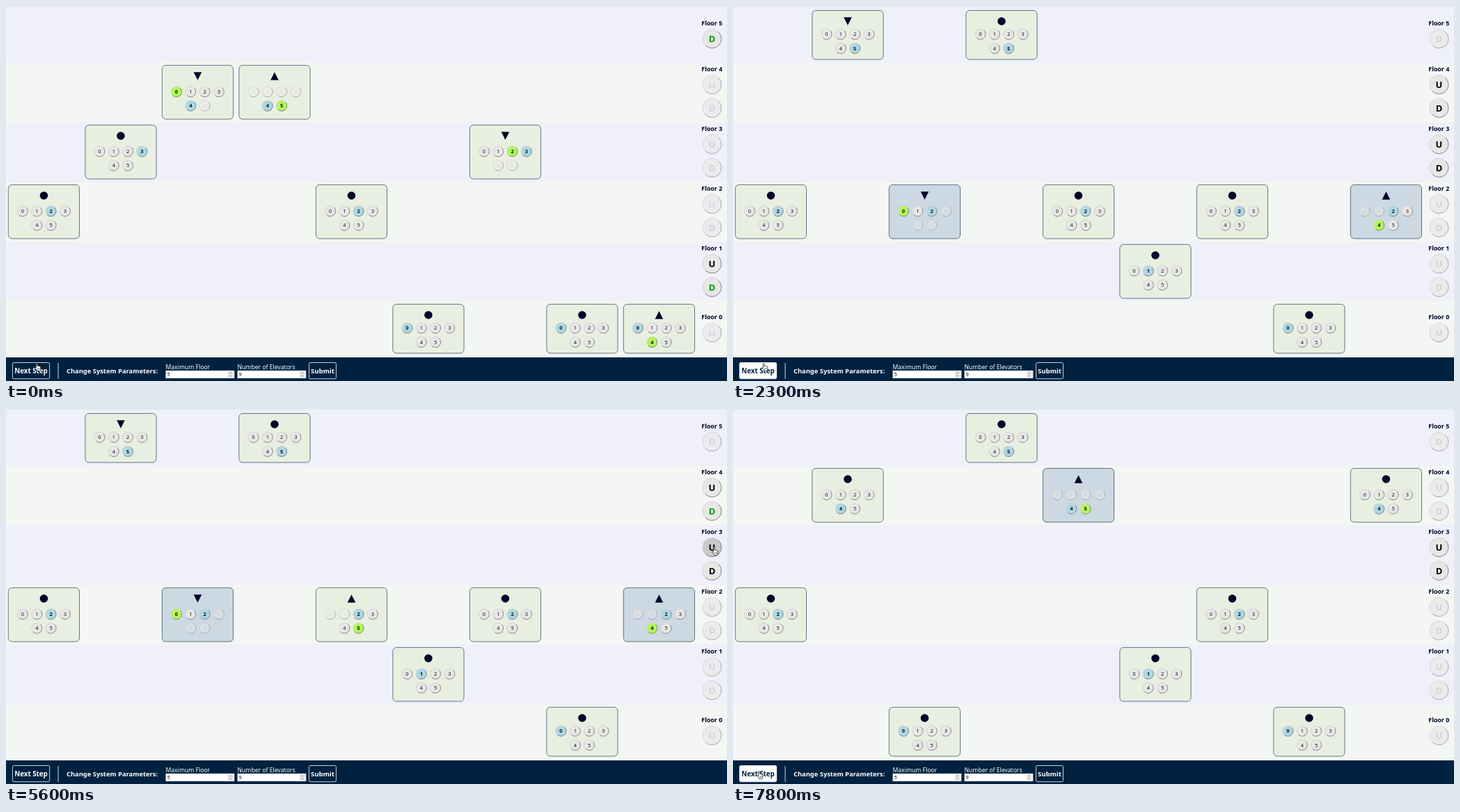
Write an HTML page that moves like this. It is 1036x540 px and loops after 8 s.

```html
<!DOCTYPE html>
<html lang="en">
<head>
<meta charset="utf-8">
<title>Elevators</title>
<style>
html, body { margin: 0; width: 100%; height: 100%; overflow: hidden; background: #f3f6f2; }
svg { display: block; width: 1036px; height: 540px; font-family: "Noto Sans", "Open Sans", sans-serif; }
</style>
</head>
<body>
<svg id="stage" viewBox="0 0 1036 540"></svg>
<script>
const LOOP = 8000, TICK = 100, TOP = 5;
const NAVY = '#002140', INK = '#000428', LAVENDER = '#f0f0fb';
const BOLD = 'font-weight="700"', MID = 'text-anchor="middle"';
const stage = document.getElementById('stage');

// --- Elevator model: direction is -1, 0 or 1; a call is a floor and U or D

const newCars = () => [...'234420300'].map((f, i) => {
  const floor = +f, digit = '--05--2-4'[i];
  const goal = digit === '-' ? null : +digit;
  return { floor, goal, dir: goal === null ? 0 : Math.sign(goal - floor), call: null, moving: false };
});

function advance(car) {
  const stop = car.call ? +car.call[0] : car.goal;
  if (stop === null) { car.dir = 0; return; }
  car.dir = Math.sign(stop - car.floor);
  car.floor += car.dir;
  car.moving = car.floor !== stop;
  if (car.moving) return;
  if (car.call) {
    car.dir = car.call[1] === 'U' ? 1 : -1;
    car.call = null;
  } else {
    car.goal = null;
    car.dir = 0;
  }
}

const step = cars => cars.forEach(advance);
const assign = (i, call) => cars => { cars[i].call = call; };
const send = (i, goal) => cars => { cars[i].goal = goal; cars[i].dir = Math.sign(goal - cars[i].floor); };

const events = [
  [0, assign(1, '5D')], [0, assign(5, '1D')],
  [1500, step], [2300, step],
  [4000, send(4, 5)], [5000, assign(1, '4D')], [5700, assign(4, '3U')],
  [7300, step], [7800, step]
];

function carsAt(t) {
  const cars = newCars();
  for (const [time, act] of events) if (time <= t) act(cars);
  return cars;
}

// --- Pointer: each move has a start, an end and a resting place

const moves = [
  [0, 0, 41, 514], [2900, 3800, 503, 315], [3950, 4800, 1013, 146], [5000, 5300, 1015, 201],
  [5400, 5600, 1014, 199], [5600, 5700, 1015, 225], [5800, 6700, 71, 525], [6700, 6800, 52, 527],
  [6900, 7000, 46, 523], [7100, 7200, 34, 521]
];

const easeOut = p => 1 - (1 - p) ** 3;
const overshoot = p => 1 + 2.2 * (p - 1) ** 3 + 1.2 * (p - 1) ** 2;

function pointerAt(t) {
  const i = moves.filter(m => m[0] <= t).length - 1;
  const [start, end, x, y] = moves[i];
  if (t >= end) return { x, y, far: false };
  const [, , x0, y0] = moves[i - 1];
  const p = (t - start) / (end - start);
  return { x: x0 + (x - x0) * overshoot(p), y: y0 + (y - y0) * easeOut(p), far: end - start > 200 };
}

// --- Drawing

const rect = (x, y, w, h, fill, extra = '') =>
  `<rect x="${x}" y="${y}" width="${w}" height="${h}" fill="${fill}" ${extra}/>`;
const text = (x, y, size, str, fill, extra = '') =>
  `<text x="${x}" y="${y}" font-size="${size}" fill="${fill}" ${extra}>${str}</text>`;

// Round button with an outset border; darkens under the pointer
function knob(x, y, r, label, size, ptr, o) {
  const e = r - 0.5, d = e * Math.SQRT1_2;
  const over = !o.off && !ptr.far && Math.hypot(ptr.x + 3 - x, ptr.y + 1 - y) < r;
  const half = (sweep, color) =>
    `<path d="M${x + d} ${y - d}A${e} ${e} 0 0 ${sweep} ${x - d} ${y + d}" fill="none" stroke="${color}"/>`;
  return `<circle cx="${x}" cy="${y}" r="${r}" fill="${over ? '#c9c9cb' : o.fill}"/>` +
    half(0, o.off ? 'rgba(190,190,190,.4)' : '#d4d4d4') + half(1, o.off ? '#a9a9a9' : '#858585') +
    text(x, y + size * 0.36, size, label, o.ink, MID + (o.bold ? ' ' + BOLD : ''));
}

function drawCar(car, i, ptr) {
  const end = car.floor % TOP === 0;
  const x = 3.3 + 110.5 * i, y = car.floor === TOP ? 6.4 : 429.4 - 86 * car.floor;
  const mid = x + 51.1, ay = y + 15.6, a = 5.8 * car.dir;
  const shown = car.goal ?? (car.moving ? +car.call[0] : null);
  let s = rect(x, y, 102.2, end ? 70.6 : 77.6, car.moving ? '#ccd8e2' : '#e9efe0',
    `rx="5.4" stroke="${NAVY}" stroke-width=".6"`);
  s += car.dir
    ? `<path d="M${mid - 5.8} ${ay + a}h11.6L${mid} ${ay - a}z" fill="${INK}"/>`
    : `<circle cx="${mid}" cy="${ay}" r="5.8" fill="${INK}"/>`;
  for (let n = 0; n <= TOP; n++) {
    const row = n < 4 ? 0 : 1, col = n - (row ? 4.5 : 1.5);
    const here = n === car.floor, goal = n === shown;
    const off = (n - car.floor) * car.dir < 0;
    s += knob(mid + col * 20.3, y + (end ? 34.3 : 38) + row * 20.3, 8, n, 7.4, ptr, {
      off, bold: here || goal,
      fill: here ? '#add8e6' : goal ? '#b2f75a' : off ? 'rgba(236,236,236,.4)' : '#e7e7e6',
      ink: off ? 'rgba(16,16,16,.08)' : '#111'
    });
  }
  return s;
}

function drawFloor(f, cars, ptr) {
  const y = f === TOP ? 25 : f === 0 ? 448 : 435 - 86 * f;
  let s = text(1014.3, y + 3.2, 8.9, 'Floor ' + f, INK, MID + ' ' + BOLD);
  const kinds = f === TOP ? 'D' : f === 0 ? 'U' : 'UD';
  [...kinds].forEach((kind, i) => {
    const lit = cars.some(c => c.call === f + kind);
    const wrongWay = kind === 'U' ? -1 : 1;
    const off = !lit && cars.some(c => c.floor === f && !c.moving && c.dir !== wrongWay);
    s += knob(1014.5, y + 22.2 + i * 33.8, 14, kind, 13, ptr, {
      off, bold: true,
      fill: off ? '#ebebee' : '#e7e7e6',
      ink: lit ? '#0a9a0a' : off ? '#d3d3d9' : '#000'
    });
  });
  return s;
}

function field(x, label, value) {
  const sx = x + 89;
  return text(x, 522.5, 8.6, label, '#fff') +
    rect(x, 525, 98.6, 11, '#fff', 'stroke="#8f8f9d" stroke-width=".6"') +
    text(x + 2, 533.4, 7.4, value, '#111') +
    rect(sx, 526, 8, 9, '#ececec', 'rx="1"') +
    `<path d="M${sx + 2.2} 529.4l1.8 -1.8l1.8 1.8M${sx + 2.2} 531.6l1.8 1.8l1.8 -1.8" fill="none" stroke="#666" stroke-width=".8"/>`;
}

function button(x, w, size, label, fill) {
  return rect(x, 513.5, w, 23.3, `rgba(255,255,255,${fill})`, 'rx="2" stroke="#fff" stroke-width=".8"') +
    text(x + w / 2, 529.2, size, label, fill > 0.5 ? NAVY : '#fff', MID + ' ' + BOLD);
}

function drawFooter(t) {
  const glow = t < 2800 ? Math.min(t / 200, 1) : +(t >= 6800);
  return rect(0, 506, 1036, 34, NAVY) +
    button(9.4, 53.2, 9.75, 'Next Step', glow) +
    rect(74.5, 514, 1, 23, '#cfd6dd') +
    text(87, 529, 9.35, 'Change System Parameters:', '#fff', BOLD) +
    field(229.5, 'Maximum Floor', TOP) + field(332.5, 'Number of Elevators', 9) +
    button(435.4, 39, 9.5, 'Submit', 0);
}

function drawPointer({ x, y, far }) {
  const shape = far
    ? '<path d="M.6 .6V10L2.8 8L4.3 11.4L5.9 10.7L4.4 7.4H7.4Z" fill="#111" stroke="#fff" stroke-width=".8"/>'
    : '<path d="M2.4 6.8V1.5Q2.4 .5 3.2 .5Q4 .5 4 1.5V4.2Q5.2 3.7 5.8 4.6Q6.9 4.2 7.4 5.1Q8.8 4.8 8.8 6.2V8.6Q8.8 10 7.9 11.6H3.7Q2.9 9.7 .8 7.5Q.4 6.3 2.4 6.8Z" fill="#fff" stroke="#222" stroke-width=".8"/>' +
      '<path d="M4.3 7.4v2.2M5.7 7.4v2.2M7.1 7.4v2.2" stroke="#222" stroke-width=".6"/>';
  return `<g transform="translate(${x.toFixed(1)} ${y.toFixed(1)})">${shape}</g>`;
}

function draw(t) {
  const cars = carsAt(t), ptr = pointerAt(t);
  let s = rect(0, 0, 1036, 540, '#f3f6f2') + rect(0, 0, 1036, 1, '#e3e7dc') + rect(0, 1, 1036, 80.5, LAVENDER);
  for (const f of [1, 3]) s += rect(0, 425.5 - 86 * f, 1036, 86, LAVENDER);
  for (let f = 0; f <= TOP; f++) s += drawFloor(f, cars, ptr);
  s += cars.map((car, i) => drawCar(car, i, ptr)).join('');
  stage.innerHTML = s + drawFooter(t) + drawPointer(ptr);
}

let shown = -1;
const start = performance.now();
function frame() {
  const t = Math.floor((performance.now() - start) % LOOP / TICK) * TICK;
  if (t !== shown) draw(shown = t);
  requestAnimationFrame(frame);
}
frame();
</script>
</body>
</html>
```
